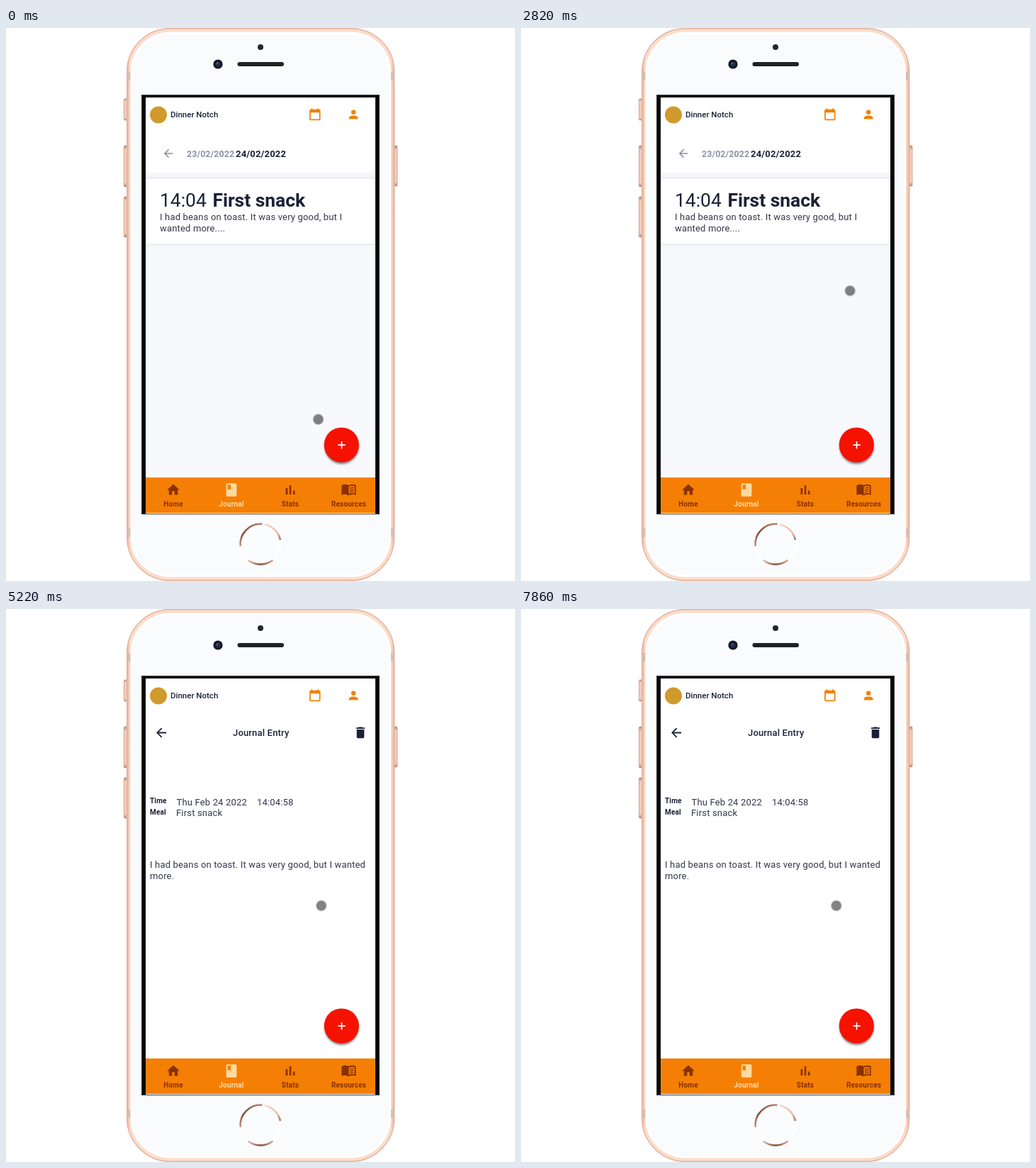
Recreate the animation shown at these times as an HTML page. Size 718x780 px, loop 7890 ms.

```html
<!DOCTYPE html>
<html lang="en">
<head>
<meta charset="utf-8">
<title>Food journal</title>
<style>
  html, body { margin: 0; width: 100%; height: 100%; overflow: hidden; background: #fff; }
  svg { display: block; width: 718px; height: 780px; }
  text { font-family: Roboto, sans-serif; font-size: 13px; letter-spacing: .17px; fill: #34364a; white-space: pre; }
  .bold { font-weight: 700; }
  .medium { font-weight: 500; }
  .ink { fill: #1b2138; }
  .title { font-size: 26.4px; letter-spacing: 0; fill: #1b2138; }
  .label { font-size: 10px; font-weight: 700; fill: #1b2138; }
  .tab text { font-size: 10px; font-weight: 700; text-anchor: middle; fill: inherit; }
  .tab { fill: #8a3100; }
  .tab.active { fill: #ffdba0; }
</style>
</head>
<body>
<svg viewBox="0 0 718 780" xmlns="http://www.w3.org/2000/svg">
  <defs>
    <linearGradient id="rim" x2="1" y2="0">
      <stop offset="0" stop-color="#e6b39c"/><stop offset=".012" stop-color="#fbdccb"/>
      <stop offset=".988" stop-color="#fbdccb"/><stop offset="1" stop-color="#e6b39c"/>
    </linearGradient>
    <linearGradient id="side" x2="0" y2="1">
      <stop offset="0" stop-color="#a98474"/><stop offset=".1" stop-color="#f3cdbb"/>
      <stop offset=".9" stop-color="#f3cdbb"/><stop offset="1" stop-color="#a98474"/>
    </linearGradient>
    <linearGradient id="ringLeft" gradientUnits="userSpaceOnUse" x1="330" y1="735" x2="362" y2="699">
      <stop offset="0" stop-color="#d9ab98"/><stop offset=".4" stop-color="#7d4c3a"/><stop offset="1" stop-color="#b98672"/>
    </linearGradient>
    <linearGradient id="ringRight" gradientUnits="userSpaceOnUse" x1="365" y1="699" x2="388" y2="722">
      <stop offset="0" stop-color="#f5d9cc"/><stop offset=".7" stop-color="#e9bba8"/><stop offset="1" stop-color="#9a6a57"/>
    </linearGradient>
    <linearGradient id="ringBottom" gradientUnits="userSpaceOnUse" x1="340" y1="0" x2="378" y2="0">
      <stop offset="0" stop-color="#eccbbd"/><stop offset=".5" stop-color="#84523f"/><stop offset="1" stop-color="#dcae9b"/>
    </linearGradient>
    <filter id="soft" x="-30%" y="-30%" width="160%" height="160%"><feGaussianBlur stdDeviation="1.6"/></filter>
  </defs>

  <rect width="718" height="780" fill="#fff"/>

  <!-- phone -->
  <g fill="url(#side)" stroke="#c99a86" stroke-width=".8">
    <rect x="166.4" y="100" width="6" height="30" rx="1.5"/>
    <rect x="166.4" y="166" width="6" height="58" rx="1.5"/>
    <rect x="166.4" y="238" width="6" height="57" rx="1.5"/>
    <rect x="546" y="166" width="6" height="57" rx="1.5"/>
  </g>
  <rect x="170.7" y=".7" width="377" height="778.6" rx="61" fill="url(#rim)" stroke="#e3b29d" stroke-width="1.4"/>
  <g fill="#d9bdb1">
    <rect x="171" y="62" width="6" height="12"/><rect x="542" y="62" width="6" height="12"/>
    <rect x="171" y="706" width="6" height="12"/><rect x="542" y="706" width="6" height="12"/>
  </g>
  <rect x="175.5" y="5.5" width="367.5" height="769" rx="56" fill="#fff"/>
  <rect x="179" y="9" width="360.5" height="762" rx="53" fill="#f9fbfd"/>
  <circle cx="359" cy="27" r="4" fill="#24262b"/>
  <rect x="326.5" y="48" width="65.5" height="6" rx="3" fill="#202226"/>
  <circle cx="299" cy="51" r="6.6" fill="#17191f"/>
  <circle cx="299" cy="51" r="3.6" fill="#1f2c50"/>
  <circle cx="298" cy="50" r="1.2" fill="#50679a"/>
  <g fill="none" stroke-width="2.6">
    <circle cx="359" cy="728" r="28.5" fill="#fbfcfe" stroke="#fff"/>
    <path d="M330.7 731A28.5 28.5 0 0 1 361.5 699.6" stroke="url(#ringLeft)"/>
    <path d="M365 700.2A28.5 28.5 0 0 1 386.9 722" stroke="url(#ringRight)"/>
    <path d="M341.5 750.5A28.5 28.5 0 0 0 376.5 750.5" stroke="url(#ringBottom)"/>
  </g>

  <!-- screen -->
  <rect x="191.5" y="94.5" width="335" height="591" fill="#060607" stroke="#3b3d41"/>
  <rect x="197" y="98" width="324" height="587" fill="#fff"/>

  <g id="listPage">
    <g data-icon="back" data-at="229 177 .8" fill="#8a90a2"></g>
    <text x="255" y="181.6" class="bold" style="fill:#8d94a5;font-size:12.4px;letter-spacing:.1px">23/02/2022</text>
    <text x="324" y="181.6" class="bold ink">24/02/2022</text>
    <rect x="197" y="204" width="324" height="430" fill="#f8f9fd"/>
    <rect x="197" y="204" width="324" height="7" fill="#f5f6f9"/>
    <rect x="197" y="210.5" width="324" height="96" fill="#ebecf2"/>
    <rect x="197" y="212.5" width="324" height="92" fill="#fff"/>
    <text x="217" y="252" class="title">14:04</text>
    <text x="291.5" y="252" class="title bold">First snack</text>
    <text x="217" y="271.2">I had beans on toast. It was very good, but I</text>
    <text x="217" y="287.4">wanted more....</text>
  </g>

  <g id="entryPage">
    <g data-icon="back" data-at="219 174.5 .88" class="ink"></g>
    <text x="320" y="178.8" class="medium ink">Journal Entry</text>
    <g data-icon="trash" data-at="500 174.3 .88" class="ink"></g>
    <text x="203" y="274" class="label">Time</text>
    <text x="203" y="289.8" class="label">Meal</text>
    <text x="240.5" y="276.8">Thu Feb 24 2022</text>
    <text x="354" y="276.8">14:04:58</text>
    <text x="240" y="292.3">First snack</text>
    <text x="203" y="365">I had beans on toast. It was very good, but I wanted</text>
    <text x="203" y="381">more.</text>
  </g>

  <!-- header -->
  <circle cx="215" cy="122.5" r="12" fill="#d09a2c"/>
  <text x="232" y="126.3" class="medium ink" style="font-size:11.5px;letter-spacing:0">Dinner Notch</text>
  <g fill="#ee8209">
    <g data-icon="calendar" data-at="435.8 122.6 .86"></g>
    <g data-icon="person" data-at="490.2 122 .8"></g>
  </g>

  <!-- add button -->
  <circle cx="473.5" cy="591" r="24" fill="#000" opacity=".5" filter="url(#soft)"/>
  <circle cx="473.3" cy="588" r="24.6" fill="#f61200"/>
  <path d="M468.3 588.2h10.4M473.5 583v10.4" stroke="#fff" stroke-width="1.7"/>

  <!-- tab bar -->
  <rect x="197" y="634" width="324" height="50" fill="#f57f04"/>
  <g id="tabs"></g>

  <g id="cursor">
    <circle r="8.2" fill="#777" opacity=".28"/>
    <circle r="6.9" fill="#000" opacity=".4"/>
  </g>
</svg>
<script>
const LOOP = 7890, PAGE_SWITCH = 3450;

const icons = {
  back: 'M20 11V13H8L13.5 18.5L12.08 19.92L4.16 12L12.08 4.08L13.5 5.5L8 11Z',
  calendar: 'M19 19H5V8H19M16 1V3H8V1H6V3H5C3.89 3 3 3.89 3 5V19A2 2 0 0 0 5 21H19A2 2 0 0 0 21 19V5C21 3.89 20.1 3 19 3H18V1Z',
  person: 'M12 4A4 4 0 0 1 12 12A4 4 0 0 1 12 4M12 14C16.42 14 20 15.79 20 18V20H4V18C4 15.79 7.58 14 12 14Z',
  trash: 'M19 4H15.5L14.5 3H9.5L8.5 4H5V6H19M6 19A2 2 0 0 0 8 21H16A2 2 0 0 0 18 19V7H6Z',
  home: 'M10 20V14H14V20H19V12H22L12 3L2 12H5V20Z',
  journal: 'M18 2H6A2 2 0 0 0 4 4V20A2 2 0 0 0 6 22H18A2 2 0 0 0 20 20V4A2 2 0 0 0 18 2ZM6 4H11V12L8.5 10.5L6 12Z',
  stats: 'M5 9.2H8V19H5ZM10.6 5H13.4V19H10.6ZM16.2 13H19V19H16.2Z',
  book: 'M12 20.5Q6.5 17.5 1 20V5Q6.5 2 12 5Q17.5 2 23 5V20Q17.5 17.5 12 20.5ZM12 7V18.3Q16.5 16 21 17.3V6.2Q16.5 4.8 12 7Z' +
    'M13.5 9Q16.5 7.5 19.5 8V9.5Q16.5 9 13.5 10.5ZM13.5 12Q16.5 10.5 19.5 11V12.5Q16.5 12 13.5 13.5ZM13.5 15Q16.5 13.5 19.5 14V15.5Q16.5 15 13.5 16.5Z'
};

const tabs = [
  ['Home', 'home', 236, .88],
  ['Journal', 'journal', 318, .92],
  ['Stats', 'stats', 401, .92],
  ['Resources', 'book', 483.5, .92]
];

// Each row: start of move, end of move, x, y reached
const moves = [
  [0, 0, 440.5, 552],
  [300, 940, 470, 516],
  [1250, 1850, 487.5, 601],
  [2300, 3150, 452.5, 255.5],
  [3750, 4500, 444.8, 418.5]
];

const byId = id => document.getElementById(id);
const ease = p => p * p * (3 - 2 * p);

byId('tabs').innerHTML = tabs.map(([name, icon, x, scale]) => `
  <g class="tab ${name === 'Journal' ? 'active' : ''}">
    <g data-icon="${icon}" data-at="${x} 651.5 ${scale}"></g>
    <text x="${x}" y="674.6">${name}</text>
  </g>`).join('');

for (const el of document.querySelectorAll('[data-icon]')) {
  const [x, y, scale] = el.dataset.at.split(' ');
  el.setAttribute('transform', `translate(${x} ${y}) scale(${scale}) translate(-12 -12)`);
  el.innerHTML = `<path fill-rule="evenodd" d="${icons[el.dataset.icon]}"/>`;
}

function cursorAt(t) {
  let [, , x, y] = moves[0];
  for (const [start, end, toX, toY] of moves.slice(1)) {
    if (t <= start) break;
    const p = ease(Math.min(1, (t - start) / (end - start)));
    x += (toX - x) * p;
    y += (toY - y) * p;
  }
  return [x, y];
}

function draw(t) {
  const entryOpen = t >= PAGE_SWITCH;
  byId('listPage').style.display = entryOpen ? 'none' : '';
  byId('entryPage').style.display = entryOpen ? '' : 'none';
  byId('cursor').setAttribute('transform', `translate(${cursorAt(t)})`);
}

const began = performance.now();
function tick() {
  draw((performance.now() - began) % LOOP);
  requestAnimationFrame(tick);
}
tick();
</script>
</body>
</html>
```
